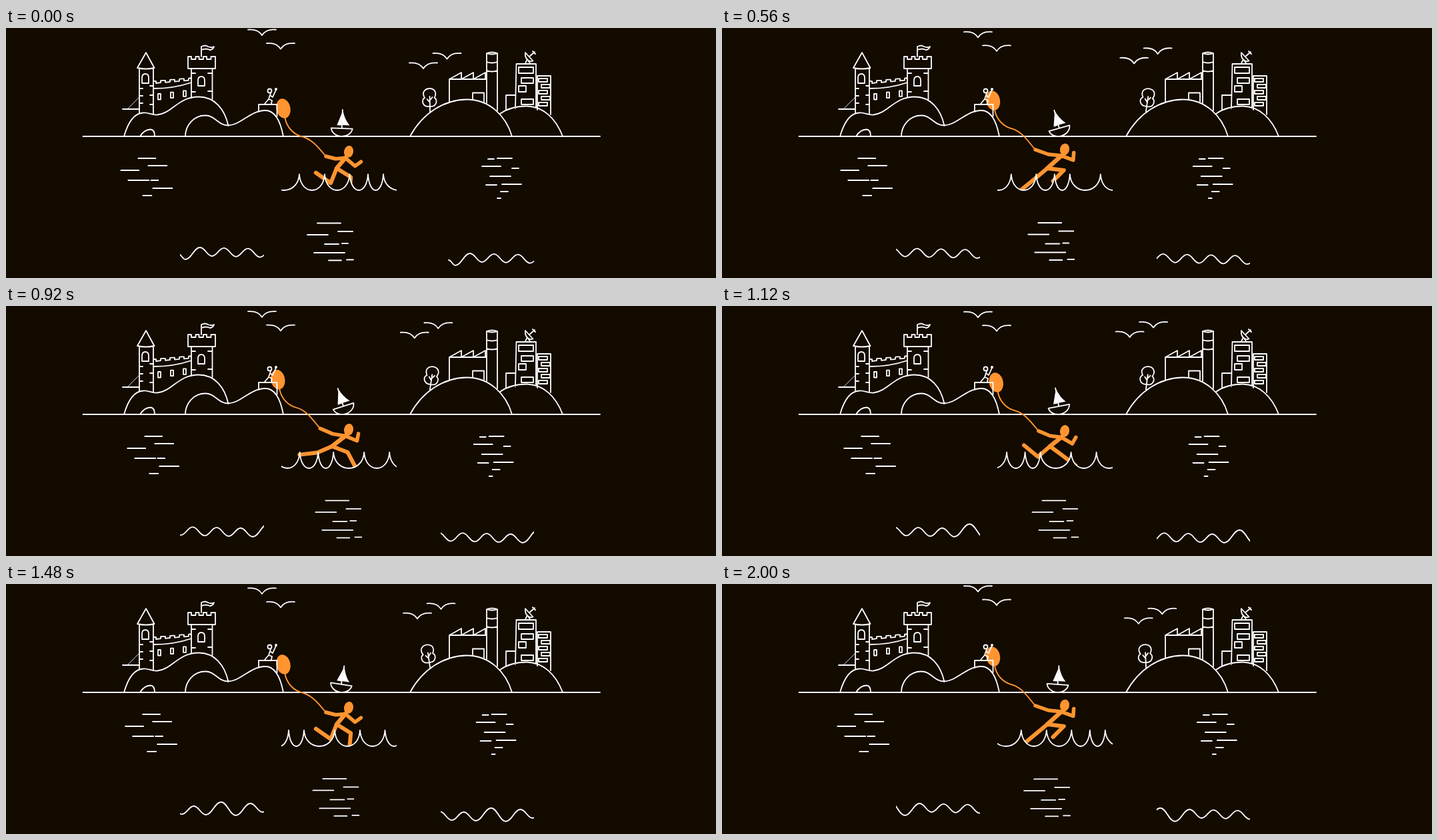
Animation of 1065 by 376 pixels, one loop 2.08 s. Source, as an HTML page with a canvas:

```html
<!DOCTYPE html>
<html lang="en">
<head>
<meta charset="utf-8">
<title>Runner with balloon</title>
<style>
  html, body { margin: 0; width: 100%; height: 100%; overflow: hidden; background: #130a00; }
  canvas { display: block; }
</style>
</head>
<body>
<canvas id="stage" width="1065" height="376"></canvas>
<script>
const ctx = document.getElementById('stage').getContext('2d');
const NIGHT = '#130a00', WHITE = '#fff', ORANGE = '#ff9430';
const LOOP = 2080, STEP = 40, CYCLE = 49;
const { PI, sin, cos, floor, min, max, abs } = Math;

const repeat = (count, make) => Array.from({ length: count }, (_, i) => make(i)).join('');
const box = (x, y, w, h) => `M${x} ${y}h${w}v${h}h${-w}z`;
const arch = (x, y, w, h) => `M${x} ${y}v${-h}q0 -6 ${w / 2} -6t${w / 2} 6v${h}z`;

const horizon = 'M115.5 163H891';
const hills = 'M177 163C183 142 192 128 206 127.5C214 127 218 131 227 130.5C250 128 258 103.5 289 103.5C313 103.5 328 122 333.5 147' +
  'M269 163C269 146 282 131.5 299 131.5C314 131.5 318 146.5 333 146.5C352 146.5 366 124 389 124C404 124 412 142 416 163' +
  'M201 163C206 155 211 152.5 217 152.5C222 153 223 157 223 163' +
  'M606 163C625 128 657 108 691 107.5C725 107.5 750 132 759 163' +
  'M741 129C752 121 767 117.5 781 117.5C806 118 825 136 835 163';
const roundTower = 'M197 60L210 37L222.5 60Q210 63 197 60ZM200 61V129M221 61V130M175 122H200' + arch(204, 83, 10, 8) +
  repeat(3, i => `M${200} ${91 + 11 * i}h5M216 ${87 + 14 * i}h5`);
const castleWall = 'M221 80' + repeat(4, () => 'h4v3l7 -.8v-3l3 -.4') + 'V76M221 91Q252 91 278 82' +
  repeat(3, i => box(228 + 19 * i, 99 - 2.3 * i, 4, 8.5));
const squareTower = 'M273 61V43' + repeat(3, () => 'h5v4h6.5v-4') + 'h6.5V61ZM278 61V105M309.5 61V107' + arch(288, 87, 10, 8) +
  repeat(2, i => `M278 ${68 + 28 * i}h6M303 ${68 + 27 * i}h6`) +
  'M293 43V28Q299 25 303 28Q308 30 312 28Q311 32 306 33Q300 30 293 33';
const factory = 'M665 111V77' + repeat(3, () => 'l18 -10v10') + 'M665 77H721M700 108V97.5h17V111' +
  'M721 113V38M737 38V124M721 38Q729 41 737 38' + repeat(3, i => `M721 ${38 + 13 * i}q8 ${i ? 3 : -3} 16 0`);
const offices = 'M750 124V101H764M764 121L765.5 54H795V119M797 123V72H817V130' +
  repeat(4, i => i % 2 ? box(773, 59 + 16 * i, 18, 8) : box(769, 59 + 14 * i, i ? 11 : 22, 9)) +
  repeat(5, i => box(i % 2 ? 803 : 799, 76 + 9 * i, 13, 5)) +
  'M779 37C778 45 783 52 790.5 49.5ZM785 43L793 36M790 35L794 39M779 53L782 47L786 53';
const scenery = new Path2D(horizon + hills + roundTower + castleWall + squareTower + factory + offices);

const rope = new Path2D('M200 104L182 122');
const lookout = new Path2D('M379 126V115H406.5V133M397 98L394 107L388 114M394 107L399 109L398 114M396 101L400 104L405 93');
const tree = new Path2D('M636 126V103M636 112L632 107M636 109L640 104' +
  'M636 118C624 119 623 107 628.5 105C623 96 630 91 636 91C642 91 648 96 643 105C648 107 647 119 636 118');
const bird = new Path2D('M-21 0C-11 -1 -4 2 0 8.5C4 2 11 -1 21 0');
const hull = new Path2D('M488 151H520C519 158 512 163 504 163C496 163 489 158 488 151ZM504 123V151');
const sail = new Path2D('M503.5 127L496.5 146.5H503.5ZM504.5 124Q508 138 515.5 146H504.5Z');

const leftGlints = new Path2D('M199 196h26M214 207h28M173 214h27M184 229h31m3 0h11M221 241h29M206 252h13');
const rightGlints = new Path2D('M723 197h9m5 -1h22M714 208h28M759 211h10M726 223h31M720 236h16m8 -1h29M742 246h11M737 256h5');
const lowGlints = new Path2D('M467 293.5h35M498 306h22M452 311h31M478 325h21m5 -1h9M462 338h46M484 349.5h19m8 -1h10');

// regular ripples that sink slightly, then one large swell, repeated
const RIPPLE_WIDTH = 265, RIPPLE_SPEED = RIPPLE_WIDTH / CYCLE;
const ripple = new Path2D();
let tip = [259, 340];
ripple.moveTo(...tip);
function rippleTo(x, y) {
  const bend = 0.42 * (x - tip[0]);
  ripple.bezierCurveTo(tip[0] + bend, tip[1], x - bend, y, x, y);
  tip = [x, y];
}
rippleTo(269, 348);
for (const shift of [0, RIPPLE_WIDTH]) {
  for (let k = 0; k < 6; k++) {
    rippleTo(shift + 291 + 36 * k, 330 + 0.8 * k);
    rippleTo(shift + 309 + 36 * k, 343 + 0.8 * k);
  }
  rippleTo(shift + 512, 328);
  rippleTo(shift + 534, 348);
}

// pointed waves around the runner's legs
const SPIKE_GAPS = [46, 38, 37.5, 27.5, 23], SPIKE_SPEED = 3.4, SPIKE_TOP = 220;
const spikes = `M394 ${SPIKE_TOP}` + repeat(15, i => {
  const gap = SPIKE_GAPS[i % 5];
  return `c2 32 ${gap - 2} 32 ${gap} 0`;
});
const surf = new Path2D(spikes);
const surfBody = new Path2D(spikes + 'V262H394Z');

function stroke(path, width = 1.8, color = WHITE) {
  ctx.lineWidth = width;
  ctx.strokeStyle = color;
  ctx.stroke(path);
}

function fill(path, color) {
  ctx.fillStyle = color;
  ctx.fill(path);
}

function ellipse(x, y, rx, ry, tilt, color) {
  const path = new Path2D();
  path.ellipse(x, y, rx, ry, tilt, 0, 2 * PI);
  fill(path, color);
}

function shifted(x, y, paint) {
  ctx.save();
  ctx.translate(x, y);
  paint();
  ctx.restore();
}

function rotated(x, y, degrees, paint) {
  shifted(x, y, () => {
    ctx.rotate(degrees * PI / 180);
    ctx.translate(-x, -y);
    paint();
  });
}

function clipped(left, right, paint) {
  ctx.save();
  ctx.beginPath();
  ctx.rect(left, 0, right - left, 376);
  ctx.clip();
  paint();
  ctx.restore();
}

// eased 0..1 swell: quick rise, slower fall
function swell(n) {
  const low = 19.5, rise = 18.5, t = (n - low + CYCLE) % CYCLE;
  const phase = t < rise ? t / rise : 1 + (t - rise) / (CYCLE - rise);
  return (1 - cos(PI * phase)) / 2;
}

// end of a limb; 0 degrees hangs straight down, 90 points ahead
function reach([x, y], length, degrees) {
  const a = degrees * PI / 180;
  return [x + length * sin(a), y + length * cos(a)];
}

function drawRunner(step) {
  const turn = 2 * PI * step / 5, pull = sin(PI * step / 6);
  const swing = (mean, c, s) => mean + c * cos(turn) + s * sin(turn);
  const limb = (width, ...joints) => stroke(new Path2D('M' + joints.join('L')), width, ORANGE);

  const [bx, by] = [416 - 9.5 * pull, 121 - 12 * pull];
  const headY = 185 + 3 * cos(turn - 2 * PI / 5);
  const shoulder = [509, headY + 9.5];
  const hip = [496 - 8 * pull, 211];
  const hand = [480 - 10 * pull, 193 - 10 * pull];
  const elbow = [(hand[0] + shoulder[0]) / 2, (hand[1] + shoulder[1]) / 2 + 2.5];
  const frontElbow = reach(shoulder, 19, 50 + 20 * pull);
  const frontHand = reach(frontElbow, 11, 126 + 50 * pull);
  const backKnee = reach(hip, 24, swing(-42, 20, -14));
  const backFoot = reach(backKnee, 27, swing(-93, -32, -28));
  const frontKnee = reach(hip, 25, swing(68, -10, -12));
  const frontFoot = reach(frontKnee, 23, swing(-7, 2, 62));

  ellipse(bx, by, 10.5, 15, -0.2, ORANGE);
  stroke(new Path2D(`M${bx + 2.5} ${by + 14}c2.5 15 13.5 25 24.5 28` +
    `C${bx + 44} ${by + 46} ${hand[0] - 10} ${hand[1] - 11} ${hand}`), 1.9, ORANGE);
  ellipse(514, headY, 7, 9, 0.2, ORANGE);
  limb(5.5, hand, elbow, shoulder, frontElbow, frontHand);
  limb(6.5, shoulder, hip);
  limb(6, backFoot, backKnee, hip, frontKnee, frontFoot);
}

function draw(time) {
  // both ends and the turning point are held for two steps
  const slot = min(50, max(1, floor(time % LOOP / STEP)));
  const n = slot - (slot > 25 ? 2 : 1);
  const drift = 1 - abs(n - 25) / 25;
  const rocking = swell(n);

  ctx.fillStyle = NIGHT;
  ctx.fillRect(0, 0, 1065, 376);
  ctx.lineCap = ctx.lineJoin = 'round';

  stroke(scenery);
  stroke(rope, 0.8);
  rotated(636.5, 125, 8.5 - 19 * rocking ** 2, () => stroke(tree));
  rotated(504, 144, 30 * rocking - 19, () => {
    stroke(hull);
    fill(sail, WHITE);
  });

  for (const [x, y] of [[384, 2.5], [412, 23]]) shifted(x, y + 6.5 * drift, () => stroke(bird));
  for (const [x, y] of [[626, 52.5], [661.5, 38]]) shifted(x - 15 * drift, y - 14.5 * drift, () => stroke(bird));

  shifted(11.2 * drift - 0.6, 0, () => stroke(leftGlints));
  shifted(-14 * drift, 0, () => stroke(rightGlints));
  shifted(14 * drift, -drift, () => stroke(lowGlints));

  drawRunner(n % 5);
  clipped(413, 586, () => shifted(-SPIKE_SPEED * n, 0, () => {
    fill(surfBody, NIGHT);
    stroke(surf);
  }));
  stroke(lookout);
  ctx.beginPath();
  ctx.arc(395.5, 94.5, 3, 0, 2 * PI);
  ctx.stroke();
  ellipse(405, 92, 2, 2, 0, WHITE);

  clipped(261, 387, () => shifted(-RIPPLE_SPEED * n, 0, () => stroke(ripple)));
  clipped(652, 792, () => shifted(405 - RIPPLE_SPEED * n, 9, () => stroke(ripple)));
}

const start = performance.now();
function frame() {
  draw(performance.now() - start);
  requestAnimationFrame(frame);
}
frame();
</script>
</body>
</html>
```
